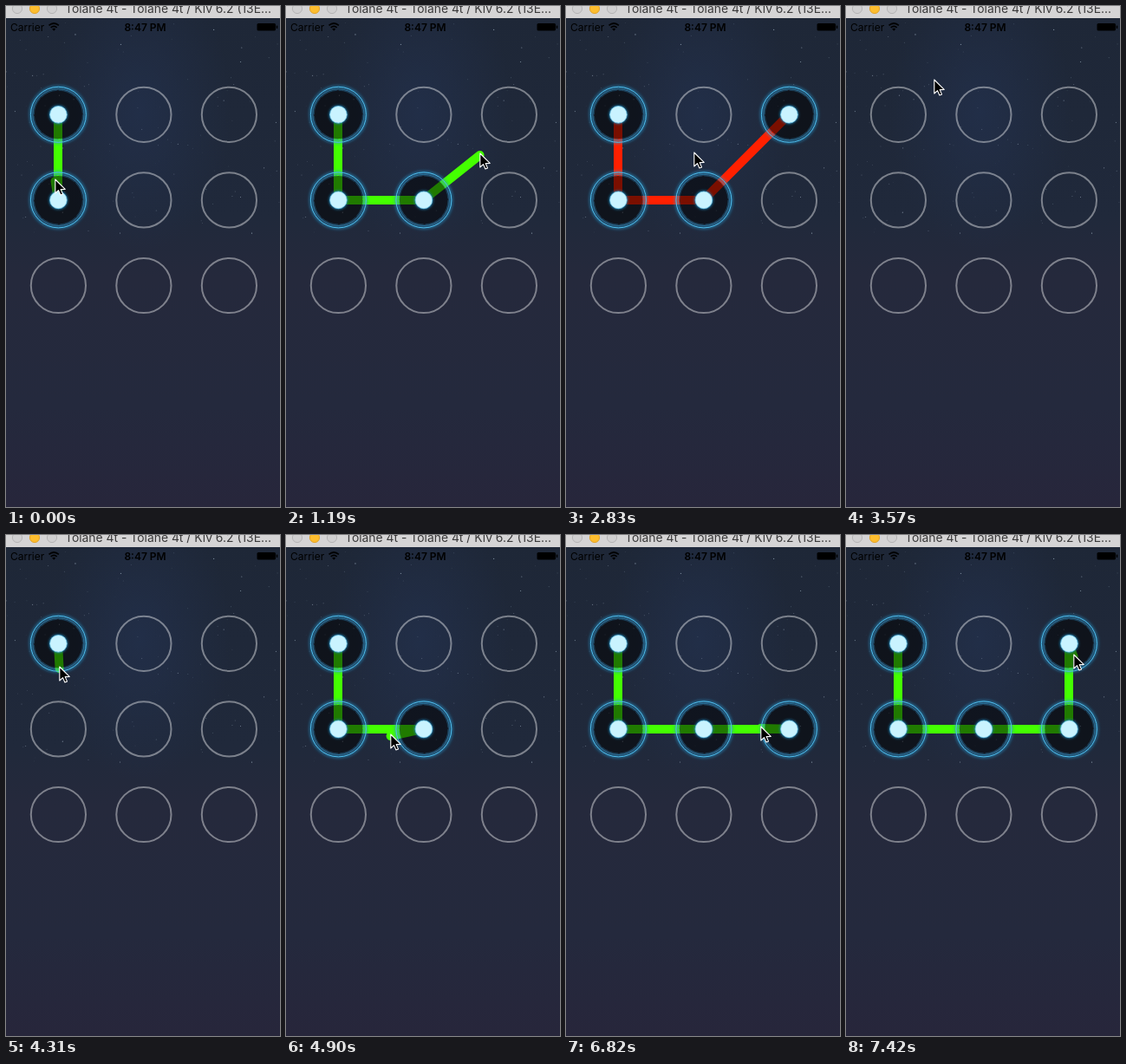
Recreate the animation shown at these times as an HTML page. Size 316x578 px, loop 8000 ms.

```html
<!DOCTYPE html>
<html lang="en">
<head>
<meta charset="utf-8">
<title>Pattern lock</title>
<style>
  html, body { margin: 0; width: 100%; height: 100%; overflow: hidden; background: #242a3d; }
  svg { display: block; width: 100vw; height: 100vh; }
  text { font-family: Inter, Roboto, sans-serif; }
  .idle { fill: none; stroke: #fff; stroke-opacity: .41; stroke-width: 2; }
  #trail { fill: none; stroke-width: 10; stroke-linecap: round; stroke-linejoin: round; }
</style>
</head>
<body>
<svg viewBox="0 0 316 578" preserveAspectRatio="none">
  <defs>
    <linearGradient id="sky" x2="0" y2="1">
      <stop offset="0" stop-color="#1e2737"/>
      <stop offset=".42" stop-color="#20293b"/>
      <stop offset=".54" stop-color="#25293c"/>
      <stop offset=".8" stop-color="#24293d"/>
      <stop offset="1" stop-color="#27263b"/>
    </linearGradient>
    <radialGradient id="haze">
      <stop offset="0" stop-color="#25365a" stop-opacity=".45"/>
      <stop offset="1" stop-color="#25365a" stop-opacity="0"/>
    </radialGradient>
    <filter id="soft" x="-30%" y="-30%" width="160%" height="160%">
      <feGaussianBlur stdDeviation="1.5"/>
    </filter>
    <g id="lit">
      <circle r="32" fill="none" stroke="#2793cc" stroke-opacity=".5" stroke-width="4" filter="url(#soft)"/>
      <circle r="28" fill="#000" fill-opacity=".52"/>
      <circle r="28" fill="none" stroke="#1d5878" stroke-opacity=".5" stroke-dasharray="20 2"/>
      <circle r="29.6" fill="none" stroke="#2f8fbf" stroke-opacity=".8" stroke-width=".8"/>
      <circle r="32" fill="none" stroke="#4fbdec" stroke-width="1"/>
      <circle r="10.6" fill="#1d83b8" filter="url(#soft)"/>
      <circle r="9.8" fill="#c9f3ff" stroke="#7fd3f2" stroke-width=".7"/>
    </g>
  </defs>

  <rect width="316" height="578" fill="url(#sky)"/>
  <ellipse cx="155" cy="120" rx="105" ry="165" fill="url(#haze)"/>
  <g id="stars" fill="#b9cbdc"></g>
  <g id="idle"></g>
  <polyline id="trail" transform="translate(-.4 0)"/>
  <g id="active"></g>

  <rect width="316" height="14" fill="#d5d4d5"/>
  <g fill="#d0cfd0" stroke="#b5b4b5">
    <circle cx="13" cy="3" r="5.6"/>
    <circle cx="33" cy="3" r="5.6" fill="#fdbd2e" stroke="#e2a32a"/>
    <circle cx="53" cy="3" r="5.6"/>
  </g>
  <text x="68" y="7.5" font-size="13.9" fill="#3b3a3b">Tolane 4t - Tolane 4t / Kiv 6.2 (13E...</text>

  <text x="5" y="28.5" font-size="12">Carrier</text>
  <text x="160.5" y="28.5" font-size="12" font-weight="600" text-anchor="middle">8:47 PM</text>
  <path d="M49.5 22.4Q55.2 17.6 60.9 22.4M51.7 24.8Q55.2 21.9 58.7 24.8" fill="none" stroke="#000" stroke-width="1.7"/>
  <path d="M53.2 26.6Q55.2 25 57.2 26.6L55.2 28.8Z"/>
  <rect x="289.5" y="20" width="21.5" height="8.5" rx="1.6"/>
  <rect x="311.8" y="22.6" width="1.4" height="3.4" rx=".6"/>

  <path id="cursor" d="M.8 1v16l3.7-3.4 2.4 5.4 2.6-1.1-2.3-5.3 5-.2Z" stroke="#fff" stroke-width="1.1" stroke-linejoin="round"/>
</svg>

<script>
const LOOP = 8000, TICK = 148.4, HIT_RADIUS = 40;
const GREEN = '#44ff00', RED = '#ff2000';
const RELEASE = 13, CLEAR = 20, PRESS = 29;

// key points of the pointer: tick, x, y
const route = [
  [0, 56, 199], [2, 65, 223], [5, 126, 228], [8, 223, 169], [10, 253, 131],
  [16, 253, 131], [19, 147, 168], [24, 101, 84], [27, 61, 152], [29, 61, 151],
  [31, 60, 197], [33, 120, 229], [36, 152, 312], [41, 152, 312], [42, 142, 309],
  [44, 151, 240], [46, 224, 220], [49, 261, 132], [50, 262, 137]
];

const $ = id => document.getElementById(id);
const node = i => [60.4 + i % 3 * 98.5, 125.3 + Math.floor(i / 3) * 98.6];
const nodes = [...Array(9).keys()];

function add(parent, tag, attrs) {
  const el = document.createElementNS('http://www.w3.org/2000/svg', tag);
  for (const key in attrs) el.setAttribute(key, attrs[key]);
  return parent.appendChild(el);
}

const idle = nodes.map(i => {
  const [cx, cy] = node(i);
  return add($('idle'), 'circle', { cx, cy, r: 31.6, class: 'idle' });
});
const active = nodes.map(i => {
  const [x, y] = node(i);
  return add($('active'), 'use', { href: '#lit', x, y });
});

let seed = 17;
const random = () => (seed = seed * 16807 % 2147483647) / 2147483647;
for (let i = 0; i < 120; i++) {
  add($('stars'), 'circle', {
    cx: random() * 316, cy: 18 + random() * 245,
    r: .3 + random() * .35, opacity: .15 + random() ** 2 * .6
  });
}

function pointerAt(tick) {
  const next = route.findIndex(key => key[0] > tick);
  if (next < 0) return route.at(-1).slice(1);
  const [t0, x0, y0] = route[next - 1], [t1, x1, y1] = route[next];
  const part = (tick - t0) / (t1 - t0);
  return [x0 + (x1 - x0) * part, y0 + (y1 - y0) * part];
}

const dragging = tick => tick < RELEASE || tick >= PRESS;

// Touching a node selects it; going back to the one before drops the last.
function chosenAt(tick) {
  let chosen = [0, 3];
  for (let t = 0; t <= tick; t++) {
    if (t === CLEAR) chosen = [];
    if (!dragging(t)) continue;
    const [x, y] = pointerAt(t);
    const hit = nodes.find(i => Math.hypot(node(i)[0] - x, node(i)[1] - y) < HIT_RADIUS);
    if (hit === undefined) continue;
    if (hit === chosen.at(-2)) chosen.pop();
    else if (!chosen.includes(hit)) chosen.push(hit);
  }
  return chosen;
}

function show(tick) {
  const [x, y] = pointerAt(tick);
  const chosen = chosenAt(tick);
  const points = chosen.map(node);
  if (dragging(tick)) points.push([x + 1, y + 3]);
  $('trail').setAttribute('points', points.join(' '));
  $('trail').setAttribute('stroke', dragging(tick) ? GREEN : RED);
  $('cursor').setAttribute('transform', `translate(${x} ${y})`);
  for (const i of nodes) {
    const on = chosen.includes(i);
    idle[i].style.display = on ? 'none' : '';
    active[i].style.display = on ? '' : 'none';
  }
}

let current;
function play() {
  const tick = Math.floor((performance.now() % LOOP + 10) / TICK);
  if (tick !== current) show(current = tick);
  requestAnimationFrame(play);
}
play();
</script>
</body>
</html>
```
